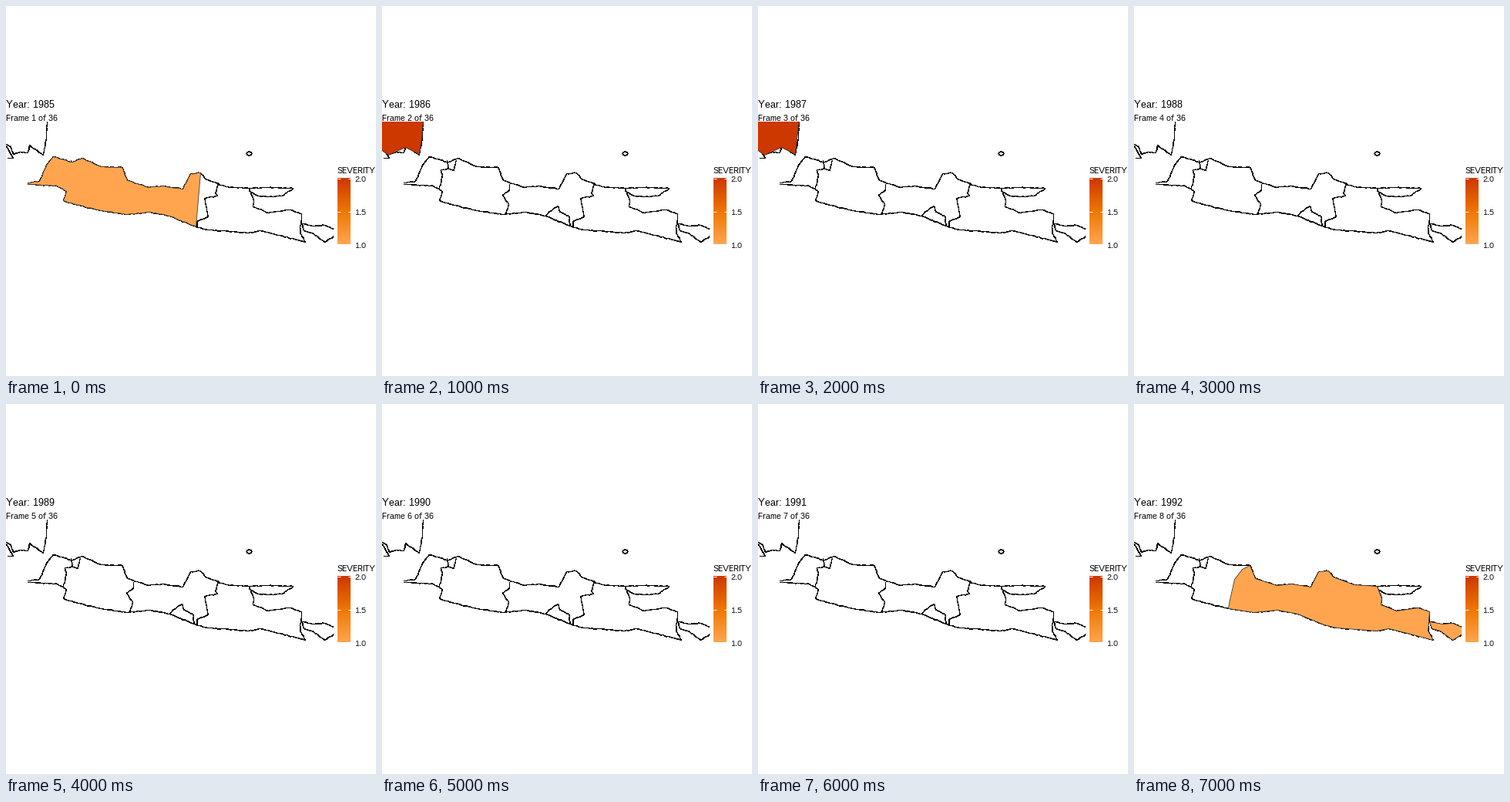
Recreate the animation shown at these times as a matplotlib script. Size 480 by 480 pixels, loop 8000 ms.

```python
import numpy as np
import matplotlib.pyplot as plt
from matplotlib.animation import FuncAnimation
from matplotlib.colors import LinearSegmentedColormap
from matplotlib.patches import Polygon

SIZE = 480
PANEL = (0, 150, 425, 310)  # left, top, right, bottom
LOW, MID, HIGH = "#FFA54F", "#EE7600", "#CD3700"

plt.rcParams.update({
    "font.family": "Liberation Sans",
    "text.hinting": "native",
    "text.hinting_factor": 1,
    "text.kerning_factor": 6,
    "path.simplify": False,
})
rng = np.random.default_rng(5)

# Key points of the coasts, in stage pixels
north = [
    (28, 229), (43, 227), (52, 206), (61, 195), (85, 202), (98, 197), (123, 208),
    (150, 209), (157, 226), (185, 235), (204, 233), (229, 237), (239, 217),
    (252, 216), (258, 224), (285, 234), (315, 236),
]
east = [(315, 236), (321, 252), (320, 260), (340, 268), (368, 264), (383, 269),
        (381, 294), (388, 306)]
south = [
    (388, 306), (354, 297), (330, 291), (314, 294), (262, 290), (246, 286),
    (212, 272), (186, 267), (155, 270), (122, 265), (82, 255), (74, 252),
    (78, 240), (66, 233), (28, 231),
]
sumatra = [(53, 150), (52, 170), (48, 193), (30, 180), (28, 190), (18, 189),
           (9, 192), (5, 182), (0, 179)]
cape = [(0, 181), (9, 197), (2, 197)]
madura = [(315, 236), (340, 235), (372, 236), (360, 245), (346, 247), (326, 246), (315, 239)]
bali = [(427, 290), (413, 284), (400, 285), (383, 282), (386, 291), (397, 294),
        (413, 306), (427, 297)]

# Province borders
borders = [
    [(84, 200), (86, 211), (76, 212), (78, 219), (74, 236)],
    [(96, 200), (93, 213), (86, 211)],
    [(165, 231), (165, 238), (156, 245), (164, 257), (160, 269)],
    [(212, 272), (217, 266), (228, 259), (231, 267), (242, 272), (244, 285)],
    [(275, 229), (271, 242), (274, 246), (257, 249), (262, 273), (247, 279), (247, 287)],
]
# Groups of islets: centre x, centre y, spread x, spread y, count
islets = [
    (37, 198, 2, 5, 5), (79, 187, 1.5, 8, 6), (29, 223, 2, 2, 8), (45, 238, 4, 1, 4),
    (229, 192, 5, 2, 9), (388, 163, 1, 1, 2), (383, 180, 1, 3, 4),
    (341, 295, 2.5, 1.5, 10), (380, 242, 3, 2, 8), (389, 244, 3, 0.7, 4),
    (419, 236, 6, 3, 18), (409, 309, 2, 0.7, 3),
]
turn = np.linspace(0, 2 * np.pi, 11)
bawean = np.column_stack([315 + 3.5 * np.cos(turn), 191 + 2.5 * np.sin(turn)])


def roughen(points, step=2.5, amount=0.6):
    """Split a line into short pieces and shake the inner points."""
    pts = np.array(points, float)
    out = [pts[0]]
    for a, b in zip(pts[:-1], pts[1:]):
        n = max(1, int(np.hypot(*(b - a)) / step))
        for k in range(1, n + 1):
            shake = rng.uniform(-amount, amount, 2) if k < n else 0
            out.append(a + (b - a) * k / n + shake)
    return np.array(out)


fig = plt.figure(figsize=(SIZE / 72, SIZE / 72), dpi=72, facecolor="white")


def add_axes(left, top, right, bottom):
    ax = fig.add_axes([left / SIZE, 1 - bottom / SIZE,
                       (right - left) / SIZE, (bottom - top) / SIZE])
    ax.axis("off")
    return ax


def add_area(ax, points, colour):
    return ax.add_patch(Polygon(points, facecolor=colour, edgecolor="#333333",
                                lw=0.8, zorder=2, visible=False))


panel = add_axes(*PANEL)
north_west, north_east = roughen(north[:14]), roughen(north[13:])
south_east, south_west = roughen(south[:6]), roughen(south[5:])
coasts = [north_west, north_east, south_east, south_west]
coasts += [roughen(line) for line in [east, sumatra, cape, madura, bali, bawean] + borders]
for line in coasts:
    panel.plot(*line.T, color="black", lw=0.35, aa=False, zorder=1)
for x, y, dx, dy, count in islets:
    panel.scatter(x + rng.uniform(-dx, dx, count), y + rng.uniform(-dy, dy, count),
                  s=0.8, c="black", marker="s", lw=0, antialiased=False, zorder=1)
panel.set_xlim(PANEL[0] - 0.5, PANEL[2] - 0.5)
panel.set_ylim(PANEL[3] - 0.5, PANEL[1] - 0.5)


def lampung(edge):
    return [(-2, 148), (53, 148), (edge, 172), (48, 192), (30, 183), (8, 193), (-2, 186)]


central_edge = [(123, 258), (130, 227), (140, 214)]
areas = {
    0: [add_area(panel, np.vstack([north_west, south_west]), LOW)],
    1: [add_area(panel, lampung(51), HIGH)],
    2: [add_area(panel, lampung(50), HIGH)],
    7: [add_area(panel, central_edge + north[7:] + east + south[:10], LOW),
        add_area(panel, bali, LOW)],
}

stage = add_axes(0, 0, SIZE, SIZE)
severity = LinearSegmentedColormap.from_list("severity", [LOW, MID, HIGH])
stage.imshow(np.linspace(1, 0, 172)[:, None], cmap=severity, aspect="auto",
             extent=(430, 447, 309, 223), interpolation="nearest")
stage.set_xlim(0, SIZE)
stage.set_ylim(SIZE, 0)


def label(x, y, text, size):
    return stage.text(x, y, text, fontsize=size, color="black", va="baseline")


label(430, 217, "SEVERITY", 11)
for k, value in enumerate(("2.0", "1.5", "1.0")):
    y = 223.5 + 43 * k
    for left in (430, 443.5):
        stage.plot([left, left + 3.5], [y, y], color="white", lw=1, solid_capstyle="butt")
    label(452, y + 4.5, value, 9.6)
title = label(0, 132, "", 13)
subtitle = label(0, 149, "", 11)


def update(i):
    title.set_text(f"Year: {1985 + i}")
    subtitle.set_text(f"Frame {i + 1} of 36")
    for index, shapes in areas.items():
        for shape in shapes:
            shape.set_visible(index == i)
    return [title, subtitle]


anim = FuncAnimation(fig, update, frames=8, interval=1000, repeat=True,
                     repeat_delay=0, blit=False)
plt.show()
```
